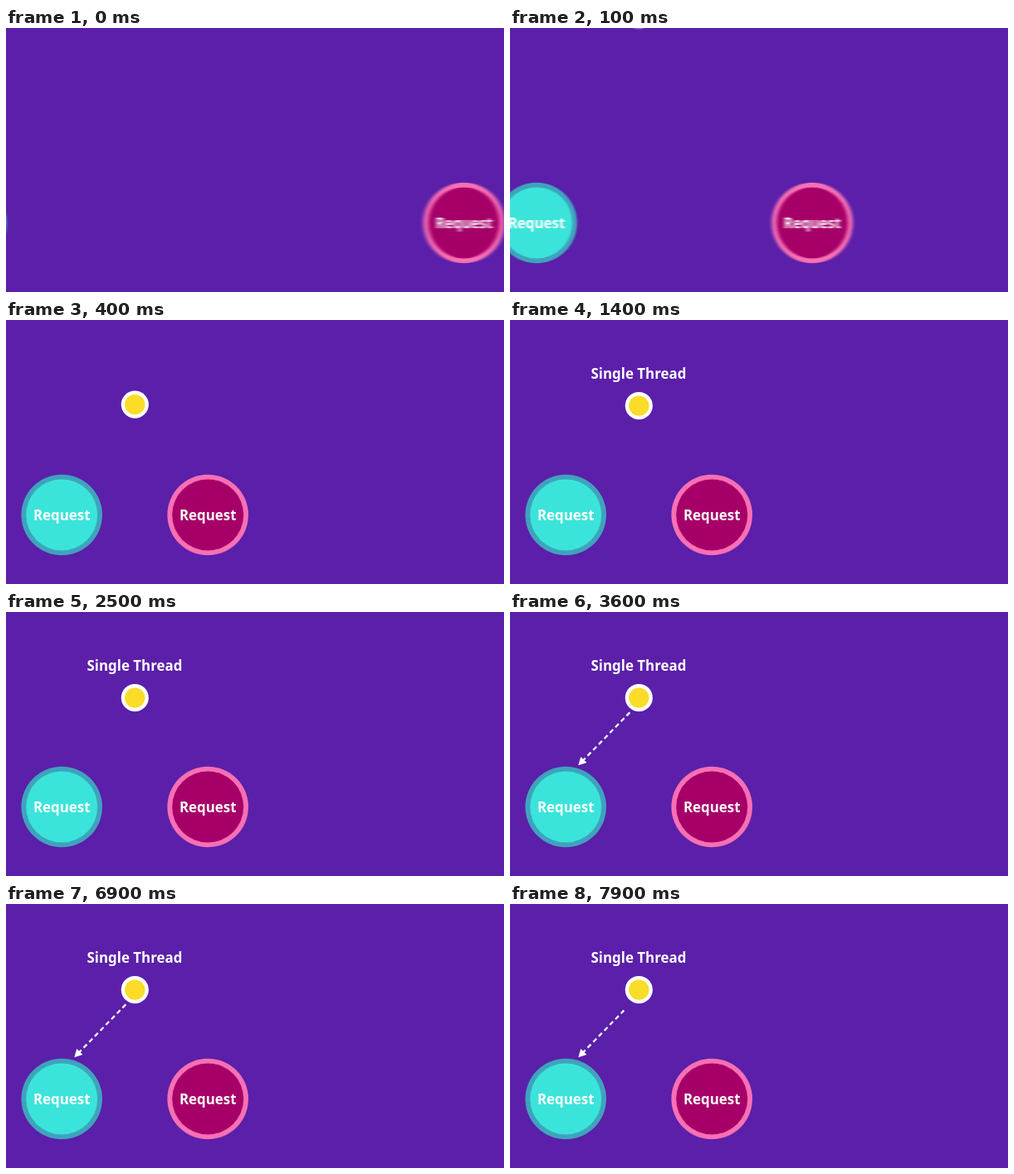
Animation, 600 px wide and 319 px high, one loop 8000 ms. Source, as an HTML page:

```html
<!DOCTYPE html>
<html lang="en">
<head>
<meta charset="utf-8">
<title>Single thread</title>
<style>
  html, body { margin: 0; width: 100%; height: 100%; overflow: hidden; background: #5b1fa9; }
  svg { display: block; width: 100%; height: 100%; }
  text { font: 600 16.9px "Noto Sans", "Open Sans", sans-serif; fill: #fff; text-anchor: middle; }
</style>
</head>
<body>
<svg viewBox="0 0 600 319">
  <defs>
    <filter id="blurCyan" x="-.5" y="-.5" width="2" height="2" color-interpolation-filters="sRGB"><feGaussianBlur/></filter>
    <filter id="blurPink" x="-.5" y="-.5" width="2" height="2" color-interpolation-filters="sRGB"><feGaussianBlur/></filter>
    <filter id="blurBall" x="-.5" y="-.5" width="2" height="2" color-interpolation-filters="sRGB"><feGaussianBlur/></filter>
  </defs>
  <g id="arrow">
    <path id="shaft" stroke="#fff" stroke-width="2.3" fill="none"/>
    <path id="head" d="M0 0L-9.4 -5V5Z" fill="#fff"/>
  </g>
  <g id="cyan">
    <circle r="48.8" fill="#3fa3bd"/>
    <circle r="43" fill="#3be4da"/>
    <text y="6.3">Request</text>
  </g>
  <g id="pink">
    <circle r="48.8" fill="#f76fb4"/>
    <circle r="43" fill="#a60068"/>
    <text y="6.3">Request</text>
  </g>
  <g id="ball">
    <circle r="16.6" fill="#fff"/>
    <circle r="12.2" fill="#fbdc28"/>
  </g>
  <text id="label" x="155" y="70.6">Single Thread</text>
</svg>
<script>
const LOOP = 8000;
const EXPOSURE = 6;   // shutter time in ms, sets the motion blur
const $ = id => document.getElementById(id);
const clamp = v => Math.min(1, Math.max(0, v));
const progress = (t, from, to) => clamp((t - from) / (to - from));
const easeInOut = p => p * p * (3 - 2 * p);

// Cubic ease-out from a starting offset to rest
const offset = (t, start, duration) => start * (1 - clamp(t / duration)) ** 3;

const movers = [
  { id: 'cyan', filter: 'blurCyan', x: 67.2, y: 235.5, dx: -116, dy: 0, duration: 308 },
  { id: 'pink', filter: 'blurPink', x: 243.2, y: 235.5, dx: 311, dy: 0, duration: 374 },
  { id: 'ball', filter: 'blurBall', x: 155.3, y: 103.6, dx: 0, dy: -240, duration: 491 }
];

function move(m, t) {
  const at = (time, d) => offset(time, d, m.duration);
  const spread = d => Math.abs(at(t + EXPOSURE / 2, d) - at(t - EXPOSURE / 2, d)) / Math.sqrt(12);
  const bx = spread(m.dx), by = spread(m.dy);
  const node = $(m.id);
  node.setAttribute('transform', `translate(${m.x + at(t, m.dx)} ${m.y + at(t, m.dy)})`);
  if (bx + by > 0.1) {
    $(m.filter).firstElementChild.setAttribute('stdDeviation', `${bx} ${by}`);
    node.setAttribute('filter', `url(#${m.filter})`);
  } else {
    node.removeAttribute('filter');
  }
}

const from = { x: 144.3, y: 121.4 }, tip = { x: 82.3, y: 185.2 };
const length = Math.hypot(tip.x - from.x, tip.y - from.y);
const angle = Math.atan2(tip.y - from.y, tip.x - from.x) * 180 / Math.PI;
const DASH = 5.6, PERIOD = 9.6;
$('arrow').setAttribute('transform', `translate(${from.x} ${from.y}) rotate(${angle})`);

function drawArrow(t) {
  const end = length * easeInOut(progress(t, 2400, 3250));
  const start = length * progress(t, 7600, 8500) ** 2;
  let d = '';
  for (let s = 0; s < end - 6; s += PERIOD) {
    const a = Math.max(s, start), b = Math.min(s + DASH, end - 6);
    if (b > a) d += `M${a} 0H${b}`;
  }
  $('shaft').setAttribute('d', d);
  $('head').setAttribute('transform', `translate(${end} 0)`);
  $('arrow').setAttribute('visibility', end > 9 ? 'visible' : 'hidden');
}

function render(t) {
  movers.forEach(m => move(m, t));
  $('label').setAttribute('opacity', easeInOut(progress(t, 900, 1300)));
  drawArrow(t);
}

const began = performance.now();
function tick() {
  render((performance.now() - began) % LOOP);
  requestAnimationFrame(tick);
}
render(0);
requestAnimationFrame(tick);
</script>
</body>
</html>
```
